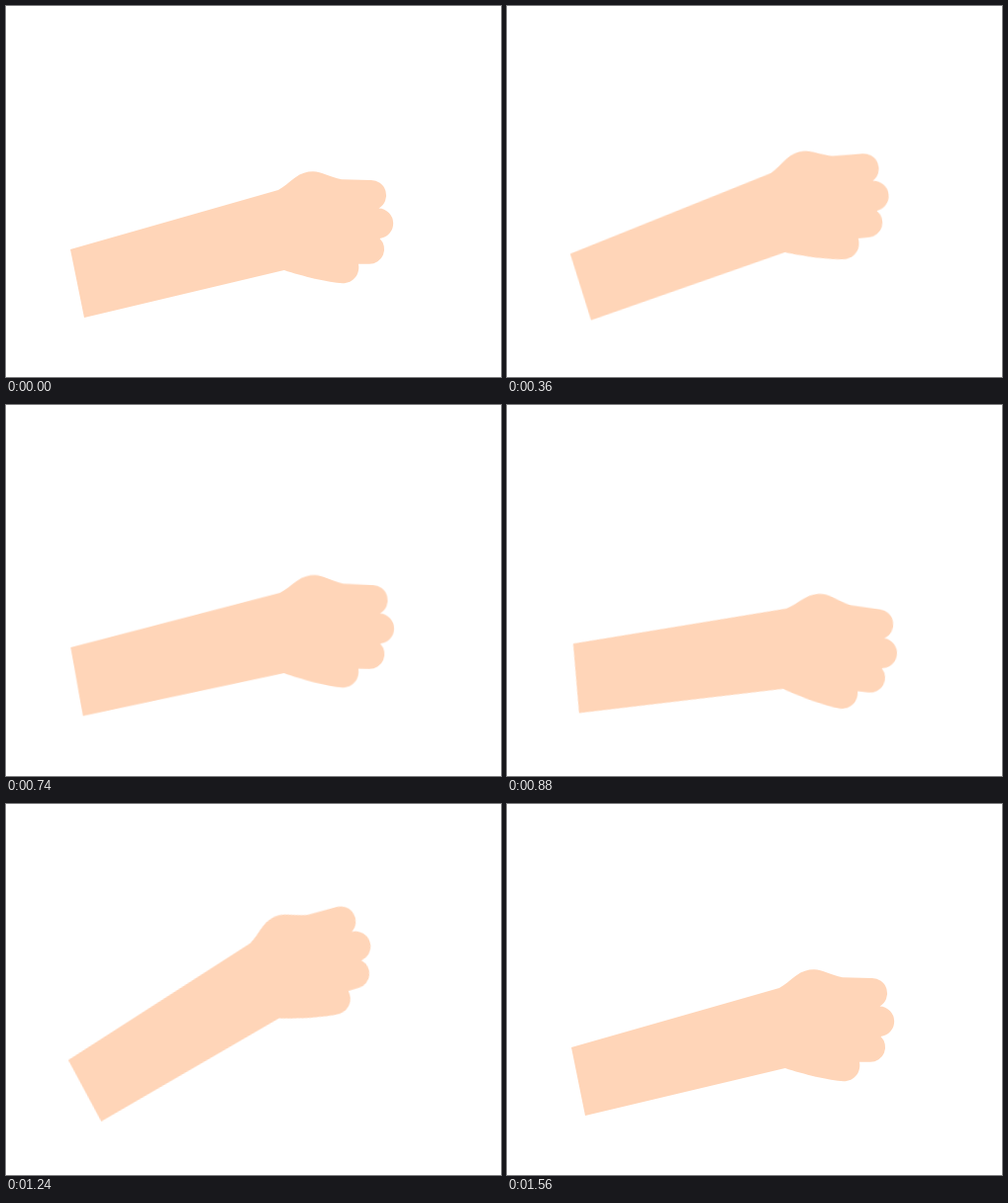
An HTML page that plays this animation: 500x375 px, repeating every 8 s.

```html
<!DOCTYPE html>
<html lang="en">
<head>
<meta charset="utf-8">
<title>Fist</title>
<style>
  html, body {
    margin: 0;
    width: 100%;
    height: 100%;
    overflow: hidden;
    background: #fff;
  }
  svg {
    display: block;
    width: 100%;
    height: 100%;
  }
  .arm {
    fill: #ffd5b8;
    transform-origin: 107.5px 259.5px;
    animation: toss 8s cubic-bezier(.333, 0, .667, 1) infinite;
  }
  /* Two tosses, each a short dip, a quick lift and a slower return, then rest. */
  @keyframes toss {
    0%, .76%    { transform: rotate(0deg); }
    3.05%       { transform: rotate(6.6deg); }
    5.1%        { transform: rotate(-9.1deg); }
    8.56%       { transform: rotate(0deg); }
    11%         { transform: rotate(6.6deg); }
    13.06%      { transform: rotate(-24.9deg); }
    19.48%, 100% { transform: rotate(0deg); }
  }
</style>
</head>
<body>
<svg viewBox="0 0 500 375">
  <path class="arm" d="M65 246 L275 186
    C281 182.500 286 178 292 173.500 C298 169 304 167.300 310 167.300
    C319 167.300 327 173 339 175.300
    L368 176 A15.300 15.300 0 0 1 376.500 204.500
    A15.300 15.300 0 0 1 377.500 235
    A15 15 0 0 1 367 260.800 L356 260.800
    C358 271 351 280.300 340 280.300
    C326 279.600 299 273 281 267
    L79 315 Z"/>
</svg>
</body>
</html>
```
